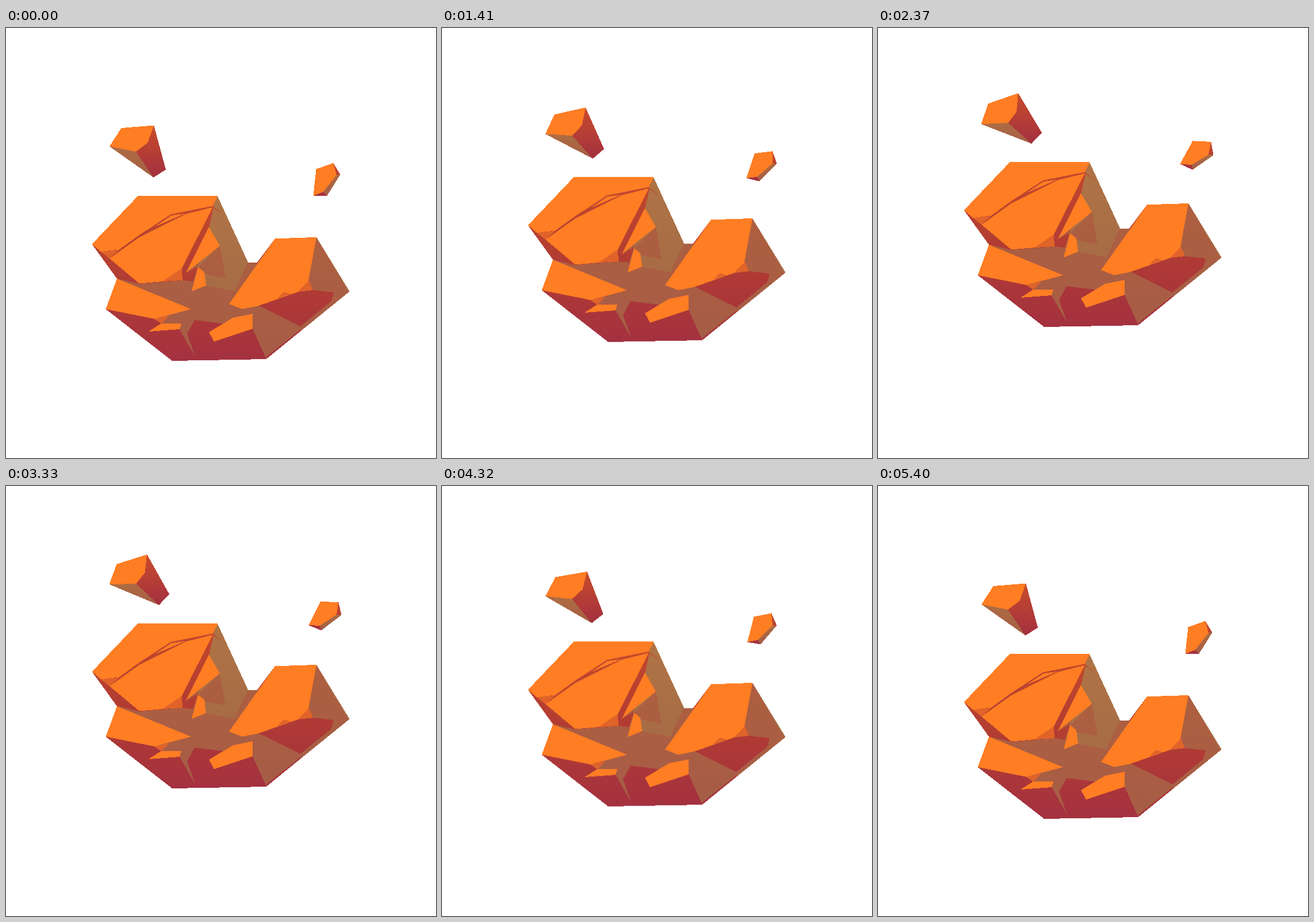
These frames come from a looping animation (748 by 748 pixels, 5430 ms). An HTML page:

```html
<!DOCTYPE html>
<html lang="en">
<head>
<meta charset="utf-8">
<title>Floating rocks</title>
<style>
  html, body { margin: 0; width: 100%; height: 100%; overflow: hidden; background: #fff; }
  svg { display: block; width: 100%; height: 100%; shape-rendering: crispEdges; }

  .lit { fill: #ff7d23; }
  .mid { fill: #e0632a; }
  .red { fill: url(#red); }
  .floor { fill: url(#floor); }
  .wall { fill: url(#wall); }
  .shard .red { fill: url(#shardRed); }
  .shard .wall { fill: url(#shardWall); }

  /* 2.7 s up, 2.7 s down, then one 30 ms rest */
  #base, .shard path {
    animation: lift 5430ms cubic-bezier(.333, 0, .667, 1) infinite;
  }
  @keyframes lift {
    0%, 99.4475%, 100% { transform: translateY(0); }
    49.7238% { transform: translateY(-61.5px); }
  }

  #leftRed { animation-name: leftRed; }
  #leftWall { animation-name: leftWall; }
  #leftLit { animation-name: leftLit; }
  #rightRed { animation-name: rightRed; }
  #rightWall { animation-name: rightWall; }
  #rightLit { animation-name: rightLit; }

  @keyframes leftRed {
    0%, 99.4475%, 100% { d: path("M257.3 169.5L278 246.3L256.5 260L226 215L246.5 199.5Z"); }
    49.7238% { d: path("M243.3 111L285.3 179.3L267.5 198.6L226.5 162.8L240.8 143.2Z"); }
  }
  @keyframes leftWall {
    0%, 99.4475%, 100% { d: path("M180 206L226 215L256.5 260Z"); }
    49.7238% { d: path("M179.5 165.5L226.5 162.8L267.5 198.6Z"); }
  }
  @keyframes leftLit {
    0%, 99.4475%, 100% { d: path("M200.7 174L257.3 169.5L246.5 199.5L226 215L180 206Z"); }
    49.7238% { d: path("M191.2 129.8L243.3 111L240.8 143.2L226.5 162.8L179.5 165.5Z"); }
  }
  @keyframes rightRed {
    0%, 99.4475%, 100% { d: path("M569.3 234.8L581.6 255L575 255.5L552 285L558.3 292L534.5 292Z"); }
    49.7238% { d: path("M579.8 196.3L583.7 219.7L575 218.5L545.2 236L546.7 244.7L525 234.2Z"); }
  }
  @keyframes rightWall {
    0%, 99.4475%, 100% { d: path("M575 255.5L581.6 255L558.3 292L552 285Z"); }
    49.7238% { d: path("M575 218.5L583.7 219.7L546.7 244.7L545.2 236Z"); }
  }
  @keyframes rightLit {
    0%, 99.4475%, 100% { d: path("M539.5 245.5L569.3 234.8L575 255.5L552 285L534.5 292Z"); }
    49.7238% { d: path("M547.8 194.3L579.8 196.3L575 218.5L545.2 236L525 234.2Z"); }
  }
</style>
</head>
<body>
<svg viewBox="0 0 748 748">
  <defs>
    <linearGradient id="red" gradientUnits="userSpaceOnUse" x1="0" y1="300" x2="0" y2="580">
      <stop stop-color="#c2482c"/><stop offset=".5" stop-color="#b23c33"/><stop offset="1" stop-color="#a43140"/>
    </linearGradient>
    <linearGradient id="floor" gradientUnits="userSpaceOnUse" x1="0" y1="365" x2="0" y2="575">
      <stop stop-color="#ae5f40"/><stop offset="1" stop-color="#a65d46"/>
    </linearGradient>
    <linearGradient id="wall" gradientUnits="userSpaceOnUse" x1="0" y1="293" x2="0" y2="460">
      <stop stop-color="#af7445"/><stop offset="1" stop-color="#a76c46"/>
    </linearGradient>
    <linearGradient id="shardRed" x2="0" y2="1">
      <stop stop-color="#c84c2b"/><stop offset="1" stop-color="#a33040"/>
    </linearGradient>
    <linearGradient id="shardWall" x2="0" y2="1">
      <stop stop-color="#ae6c42"/><stop offset="1" stop-color="#a65d46"/>
    </linearGradient>
  </defs>

  <g id="base">
    <path class="floor" d="M173.5 489L193 436L232 445L360 312L421 407.6L438 407.6L468 366.3L540 364L597.7 458.3L452.5 576L289 579Z"/>
    <path class="wall" d="M368 292.5L421 407.6L397 458L347 448L334 416L353 345L360 310Z"/>
    <path class="floor" d="M372 379L382 435L346 428L334 416Z"/>

    <!-- left block -->
    <path class="red" d="M149.5 376L230 291.6L368 292.5L360 310L382 327L361 313L353 347L313 426L334 415L325 441L307 439L232 445L193 436Z"/>
    <path class="wall" d="M368 292.5L383 326L360 310Z"/>
    <path class="lit" d="M149.5 376L230 291.6L368 292.5L360 309.5L287 324L232 360L197 385.5L165 389Z"/>
    <path class="mid" d="M165 389L197 386L180 401Z"/>
    <path class="lit" d="M180 401L232 364L313 323.5L359.5 312L306 418L272 441L232 444.5Z"/>
    <path class="lit" d="M258 346L288 326L311 323Z"/>
    <path class="mid" d="M272 441L306 418L307 439Z"/>
    <path class="lit" d="M353 346L372 379L313 426Z"/>
    <path class="lit" d="M334 416L345 424.5L348 448L323 458Z"/>

    <!-- front faces -->
    <path class="red" d="M173.5 489L258 506L270 514L248 528L302 524L329 571.5L315 532L328 508L376 514L429 523L453 576L289 579Z"/>
    <path class="lit" d="M193 436L322 489L258 506L173.5 489Z"/>
    <path class="mid" d="M258 506L285 500L270 514Z"/>
    <path class="lit" d="M270 514L305 514L302 524L248 528Z"/>
    <path class="lit" d="M353 529L395 504L429 497L429 523L362 545.5Z"/>

    <!-- right block -->
    <path class="red" d="M440 483L508 459L534 456L570 460L566 475L512 519Z"/>
    <path class="red" d="M452.5 576L512 527.5L512 525L453 572Z"/>
    <path class="red" d="M468 366.3L436 409L440 409L471 368Z"/>
    <path class="wall" d="M540 364L597.7 458.3L594.5 458Z"/>
    <path class="lit" d="M468 366.3L540 364L526 440L508 459L440 483L411 489L388 480L439 408Z"/>
    <path class="mid" d="M527 439L534 456L508 459Z"/>
    <path class="mid" d="M471 471L483 459L495 463Z"/>
  </g>

  <g class="shard">
    <path id="leftRed" class="red" d="M257.3 169.5L278 246.3L256.5 260L226 215L246.5 199.5Z"/>
    <path id="leftWall" class="wall" d="M180 206L226 215L256.5 260Z"/>
    <path id="leftLit" class="lit" d="M200.7 174L257.3 169.5L246.5 199.5L226 215L180 206Z"/>
  </g>
  <g class="shard">
    <path id="rightRed" class="red" d="M569.3 234.8L581.6 255L575 255.5L552 285L558.3 292L534.5 292Z"/>
    <path id="rightWall" class="wall" d="M575 255.5L581.6 255L558.3 292L552 285Z"/>
    <path id="rightLit" class="lit" d="M539.5 245.5L569.3 234.8L575 255.5L552 285L534.5 292Z"/>
  </g>
</svg>
</body>
</html>
```
